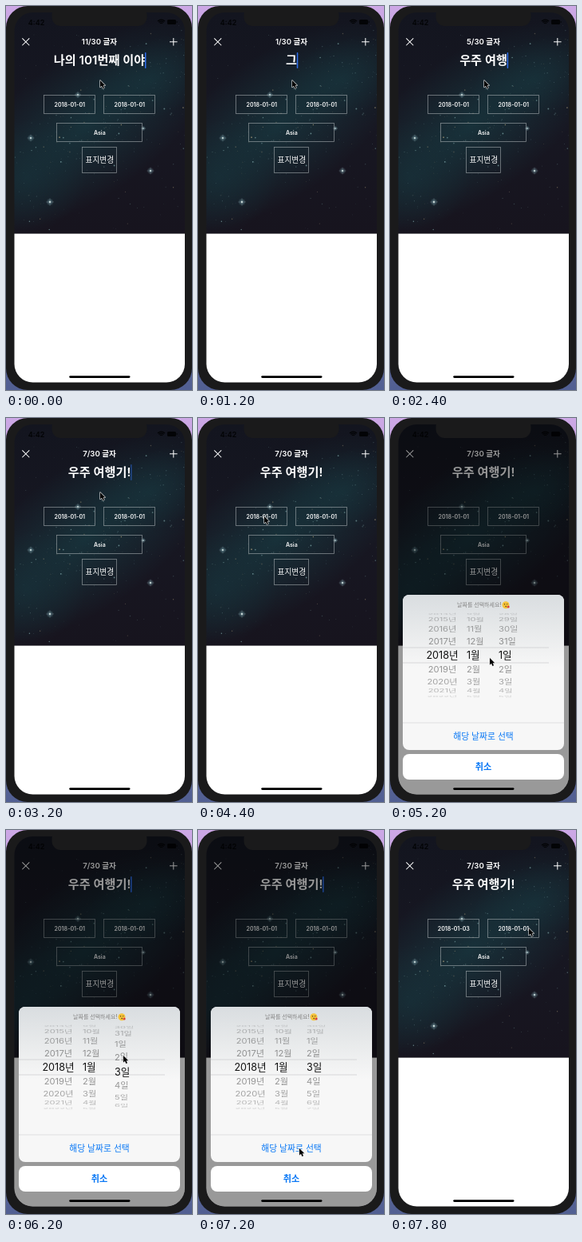
Recreate the animation shown at these times as an HTML page with a canvas. Size 233 by 480 pixels, loop 8000 ms.

```html
<!DOCTYPE html>
<html lang="ko">
<head>
<meta charset="utf-8">
<title>여행 기록</title>
<style>
html, body { margin: 0; width: 100%; height: 100%; overflow: hidden; background: #1b1b1c; }
canvas { display: block; width: 233px; height: 480px; }
</style>
</head>
<body>
<canvas id="stage"></canvas>
<script>
const W = 233, H = 480, LOOP = 8000, STEP = 200;
const SCREEN = { x: 10.5, y: 8, w: 213.5, h: 462.5, r: 23 };
const COVER = 284.6; // bottom edge of the cover picture
const BEZEL = '#1a1a1b', BLUE = '#0a78f5';
const FONT = "Inter, 'Noto Sans CJK KR', 'Noto Sans CJK', sans-serif";

const canvas = document.getElementById('stage');
const dpr = window.devicePixelRatio || 1;
canvas.width = W * dpr;
canvas.height = H * dpr;
const ctx = canvas.getContext('2d');
ctx.scale(dpr, dpr);

function ease(t, from, to) {
  const k = Math.min(1, Math.max(0, (t - from) / (to - from)));
  return k * k * (3 - 2 * k);
}

function titleAt(t) {
  const before = '나의 101번째 이야', after = '우주 여행기!';
  if (t < 1200) {
    // held backspace speeds up
    const left = 1 - (t / 1000) ** 1.5;
    return before.slice(0, Math.max(0, Math.floor(before.length * left)));
  }
  if (t < 1400) return '그';
  return after.slice(0, Math.ceil((t - 1400) / 1600 * after.length));
}

function caretAt(t) {
  if (t < 3200) return 1;
  if (t >= 4600 && t < 5600) return 0;
  const phase = t % 1000;
  return phase >= 400 ? 0 : t < 4000 ? 1 - ease(phase, 0, 400) : 1;
}

const sheetAt = t => ease(t, 4670, 5150) - ease(t, 7400, 7800);
const dayAt = t => 2 * ease(t, 5600, 6400);

// The pointer rests at each stop and travels during the last 400 ms before it
function pointerAt(t) {
  const stops = [
    [4400, 83, 123], [4800, 90, 192], [5200, 125, 300], [5600, 147, 312],
    [6200, 147, 282], [7200, 127, 398], [7800, 174, 123]
  ];
  return stops.reduce(([px, py], [at, x, y]) => {
    const k = ease(t, at - 400, at);
    return [px + (x - px) * k, py + (y - py) * k];
  }, [118, 93]);
}

function seeded(seed) {
  return () => (seed = (seed * 16807) % 2147483647) / 2147483647;
}

function fillRound(x, y, w, h, r, color) {
  ctx.fillStyle = color;
  ctx.beginPath();
  ctx.roundRect(x, y, w, h, r);
  ctx.fill();
}

function dot(x, y, r, color) {
  ctx.fillStyle = color;
  ctx.beginPath();
  ctx.arc(x, y, r, 0, 7);
  ctx.fill();
}

function line(x1, y1, x2, y2, color, width) {
  ctx.strokeStyle = color;
  ctx.lineWidth = width;
  ctx.beginPath();
  ctx.moveTo(x1, y1);
  ctx.lineTo(x2, y2);
  ctx.stroke();
}

function cross(x, y, r, angle, color, width) {
  ctx.save();
  ctx.translate(x, y);
  ctx.rotate(angle);
  line(-r, 0, r, 0, color, width);
  line(0, -r, 0, r, color, width);
  ctx.restore();
}

function clipScreen() {
  const { x, y, w, h, r } = SCREEN;
  ctx.beginPath();
  ctx.roundRect(x, y, w, h, r);
  ctx.clip();
}

// y is the optical middle of the line
function label(s, x, y, size, weight, color, align = 'center') {
  ctx.font = `${weight} ${size}px ${FONT}`;
  ctx.textAlign = align;
  ctx.fillStyle = color;
  ctx.fillText(s, x, y + size * .37);
  return ctx.measureText(s).width;
}

function vertical(y1, y2, ...colors) {
  const g = ctx.createLinearGradient(0, y1, 0, y2);
  colors.forEach((c, i) => g.addColorStop(i / (colors.length - 1), c));
  return g;
}

function phone() {
  ctx.fillStyle = vertical(0, H, '#cda8e6', '#8b83ae', '#515f92');
  ctx.fillRect(0, 0, W, H);
  fillRound(0, 0, W, H, 27, BEZEL);
}

function glow(x, y, rx, ry, angle, color, alpha) {
  ctx.save();
  ctx.translate(x, y);
  ctx.rotate(angle);
  ctx.scale(rx, ry);
  const g = ctx.createRadialGradient(0, 0, 0, 0, 0, 1);
  g.addColorStop(0, `rgba(${color},${alpha})`);
  g.addColorStop(.5, `rgba(${color},${alpha * .5})`);
  g.addColorStop(1, `rgba(${color},0)`);
  ctx.fillStyle = g;
  ctx.fillRect(-1, -1, 2, 2);
  ctx.restore();
}

function flare(x, y, r) {
  glow(x, y, r, r, 0, '150,200,210', .5);
  cross(x, y, r, 0, 'rgba(190,215,218,.4)', .5);
  dot(x, y, r * .24, '#cfdedb');
}

// A teal band of haze and fine stars climbs from lower left to upper right
function sky() {
  const rnd = seeded(4271), teal = '24,56,64';
  ctx.save();
  clipScreen();
  ctx.fillStyle = vertical(8, COVER, '#13151f', '#171722', '#17141e');
  ctx.fillRect(0, 0, W, COVER);
  glow(100, 150, 190, 88, -.62, teal, .8);
  glow(25, 215, 80, 70, -.6, teal, .5);
  glow(180, 92, 85, 48, -.4, teal, .6);
  for (let i = 0; i < 280; i++) {
    const x = SCREEN.x + rnd() * SCREEN.w;
    const inBand = rnd() < .6;
    const y = inBand ? 225 - x * .68 + (rnd() + rnd() - 1) * 75 : 26 + rnd() * 255;
    const tint = rnd() < .2 ? '205,185,140' : '150,195,195';
    dot(x, y, .3 + rnd() ** 4 * .7, `rgba(${tint},${.15 + rnd() * .5})`);
  }
  flare(90, 111, 4);
  flare(31, 165, 4.5);
  flare(55, 245, 4.8);
  flare(181, 206, 4.5);
  flare(172, 153, 3);
  ctx.restore();
}

function statusBar() {
  const ink = '#030406';
  label('4:42', 38, 20.5, 9, 600, ink);
  ctx.strokeStyle = ink;
  ctx.lineWidth = 1.2;
  for (let r = 2.3; r < 7; r += 2) {
    ctx.beginPath();
    ctx.arc(194.5, 23.5, r, -Math.PI * .75, -Math.PI * .25);
    ctx.stroke();
  }
  fillRound(202, 17, 11, 6, 1.5, ink);
  fillRound(213.6, 19, 1, 2, .5, ink);
}

function box(x, y, w, h, s, size, weight) {
  ctx.strokeStyle = 'rgba(190,196,198,.62)';
  ctx.lineWidth = .8;
  ctx.strokeRect(x + .5, y + .5, w - 1, h - 1);
  label(s, x + w / 2 + .3, y + h / 2, size, weight, '#f7f7f7');
}

function page(t) {
  ctx.fillStyle = '#fff';
  ctx.fillRect(0, COVER, W, H);
  statusBar();
  cross(24.8, 44.8, 6.3, Math.PI / 4, '#fff', 1);
  cross(209.8, 44.8, 4.8, 0, '#fff', 1);

  const title = titleAt(t);
  label(`${title.length}/30 글자`, 117, 44.8, 9.6, 600, '#fff');
  const w = label(title, 117, 67.7, 15.2, 600, '#fff');
  ctx.globalAlpha = caretAt(t);
  fillRound(116.8 + w / 2, 58, 1.5, 20, .7, '#2f70f0');
  ctx.globalAlpha = 1;

  box(47, 111, 65, 24, t < 7600 ? '2018-01-01' : '2018-01-03', 7.1, 600);
  box(122, 111, 65, 24, '2018-01-01', 7.1, 600);
  box(63, 146, 108, 24, 'Asia', 7, 600);
  box(95, 176, 44, 33, '표지변경', 9.7, 400);
}

// A picker column on a cylinder; pos is the row index at the centre
function wheel(x, pos, align, text) {
  const R = 52.7, A = .3386, mid = Math.round(pos);
  for (let i = mid - 4; i <= mid + 4; i++) {
    const a = (i - pos) * A;
    if (Math.abs(a) > 1.36) continue;
    const near = i === mid;
    ctx.save();
    ctx.translate(x, 296.5 + R * Math.sin(a));
    ctx.scale(1, Math.cos(a));
    ctx.globalAlpha = near ? 1 : .12 + .46 * Math.cos(a);
    label(text(i), 0, 0, near ? 12.6 : 11.2, 400, near ? '#111' : '#444', align);
    ctx.restore();
  }
}

const wrap = (n, size) => (n + size) % size + 1;

function emoji(x, y) {
  const ink = '#5b3a12';
  dot(x, y, 4.5, '#f4c33b');
  dot(x - 1.5, y - 1, .7, ink);
  line(x + .7, y - 1, x + 2.6, y - 1.3, ink, .7);
  dot(x + .2, y + 1.8, .8, ink);
  dot(x + 3.2, y + 2.1, 1.5, '#dc3f3c');
}

function sheet(t, p) {
  ctx.fillStyle = `rgba(0,0,0,${.4 * Math.min(1, p * 1.3)})`;
  ctx.fillRect(0, 0, W, H);
  ctx.save();
  ctx.translate(0, 250 * (1 - p));
  fillRound(16, 221, 202, 194, 8, '#f7f7f7');
  // the dark cover shows faintly through once the sheet overlaps it
  ctx.globalAlpha = ease(p, .5, 1);
  fillRound(16, 221, 202, 100, 8, vertical(221, 312, '#d9dde0', '#e8eaeb', '#f7f7f7'));
  ctx.globalAlpha = 1;
  if (t >= 7400) fillRound(16, 381, 202, 34, [0, 0, 8, 8], '#e6e6e6');
  label('날짜를 선택하세요!', 84, 233.5, 7, 500, '#858585', 'left');
  emoji(145, 233.8);

  for (const y of [287, 306]) line(16, y, 199, y, '#c4c4c6', .6);
  wheel(65.5, 0, 'center', i => `${2018 + i}년`);
  wheel(96, 0, 'left', i => `${wrap(i, 12)}월`);
  wheel(136, dayAt(t), 'left', i => `${wrap(i, 31)}일`);

  line(16, 381, 218, 381, '#cfcfd2', .6);
  label('해당 날짜로 선택', 117, 398, 10.8, 400, BLUE);
  fillRound(16, 420, 202, 32, 8, '#fff');
  label('취소', 117, 436, 11.2, 600, BLUE);
  ctx.restore();
}

const ARROW = new Path2D('M0 0V8.6L2 6.8 3.4 10 5 9.3 3.6 6.2H6.2z');

function pointer(x, y) {
  ctx.save();
  ctx.translate(x, y);
  ctx.lineJoin = 'round';
  ctx.strokeStyle = '#e8e8e8';
  ctx.lineWidth = 1.2;
  ctx.stroke(ARROW);
  ctx.fillStyle = '#000';
  ctx.fill(ARROW);
  ctx.restore();
}

// Phone and sky never change, so paint them once
const backdrop = document.createElement('canvas');
phone();
sky();
backdrop.width = canvas.width;
backdrop.height = canvas.height;
backdrop.getContext('2d').drawImage(canvas, 0, 0);

function draw(t) {
  ctx.drawImage(backdrop, 0, 0, W, H);
  ctx.save();
  clipScreen();
  page(t);
  const p = sheetAt(t);
  if (p > 0) sheet(t, p);
  fillRound(57.5, 0, 119, 25, 11, BEZEL);
  fillRound(79.2, 462.2, 76.3, 2.8, 1.4, '#000');
  ctx.restore();
  pointer(...pointerAt(t));
}

const start = performance.now();
function tick() {
  const t = (performance.now() - start) % LOOP;
  draw(Math.floor(t / STEP) * STEP);
  requestAnimationFrame(tick);
}
tick();
</script>
</body>
</html>
```
